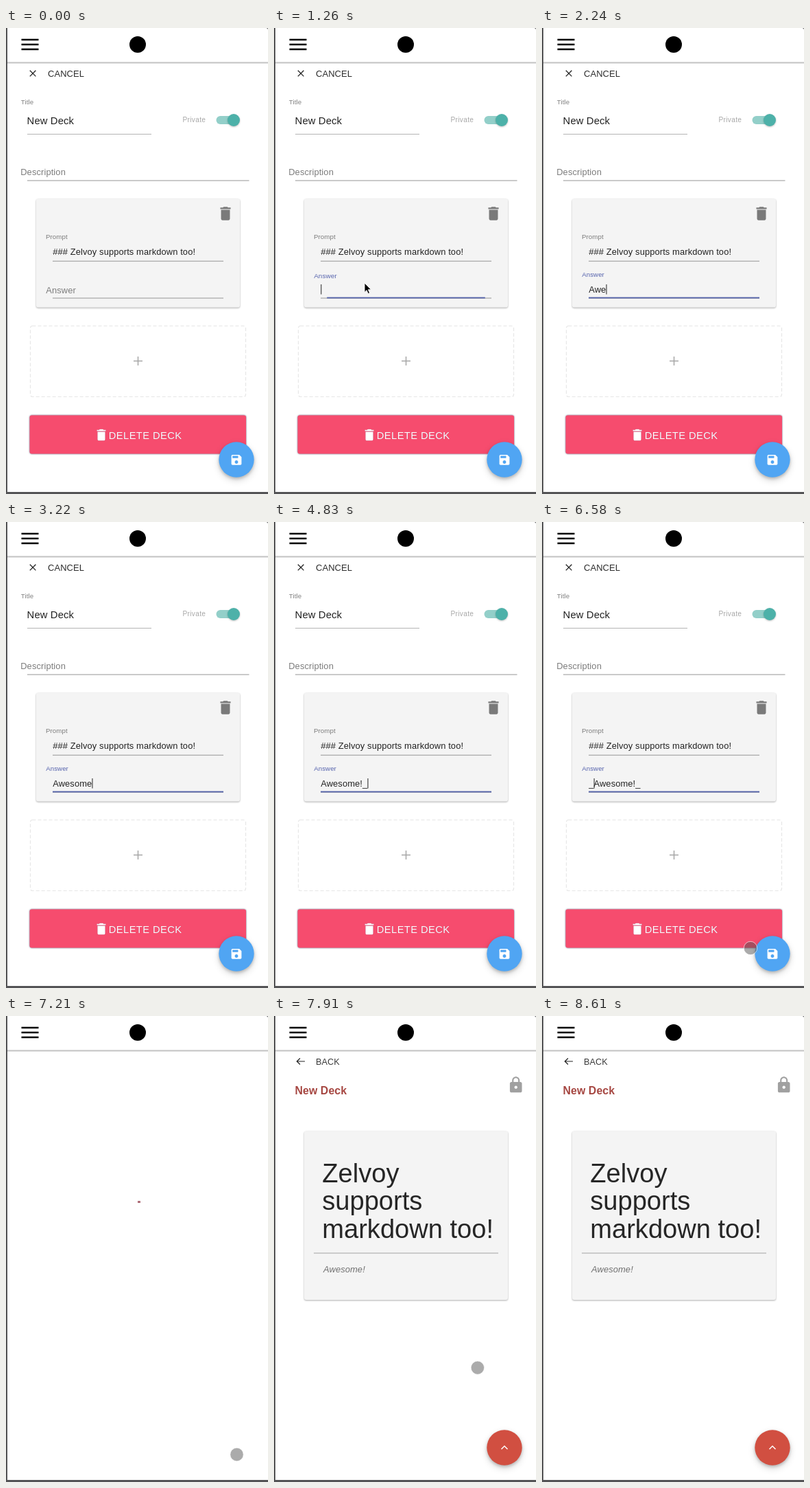
An HTML page that plays this animation: 382 by 678 pixels, repeating every 9100 ms.

```html
<!DOCTYPE html>
<html lang="en">
<head>
<meta charset="utf-8">
<title>Flashcard editor</title>
<style>
html, body { margin: 0; width: 100%; height: 100%; overflow: hidden; background: #fff; }
svg { display: block; width: 100%; height: 100%; }
text { font-family: "Liberation Sans", Arial, sans-serif; letter-spacing: .00938em; white-space: pre; }
.paper { filter: drop-shadow(0 1px 1px rgba(0,0,0,.32)); }
.raised { filter: drop-shadow(.7px .8px .9px rgba(50,40,80,.75)); }
.inked { filter: drop-shadow(.6px .7px .6px rgba(60,40,100,.5)); }
.fab { filter: drop-shadow(0 2px 2px rgba(0,0,0,.2)) drop-shadow(0 4px 5px rgba(0,0,0,.16)); }
.thumb { filter: drop-shadow(0 1px 1px rgba(0,0,0,.25)); }
</style>
</head>
<body>
<svg id="stage" viewBox="0 0 382 678" preserveAspectRatio="none">
  <defs>
    <path id="bin" d="M6 19c0 1.1.9 2 2 2h8c1.1 0 2-.9 2-2V7H6v12zM19 4h-3.5l-1-1h-5l-1 1H5v2h14V4z"/>
    <path id="disk" d="M17 3H5c-1.11 0-2 .9-2 2v14c0 1.1.89 2 2 2h14c1.1 0 2-.9 2-2V7l-4-4zm-5 16c-1.66 0-3-1.34-3-3s1.34-3 3-3 3 1.34 3 3-1.34 3-3 3zm3-10H5V5h10v4z"/>
    <path id="lock" d="M18 8h-1V6c0-2.76-2.24-5-5-5S7 3.24 7 6v2H6c-1.1 0-2 .9-2 2v10c0 1.1.9 2 2 2h12c1.1 0 2-.9 2-2V10c0-1.1-.9-2-2-2zm-6 9c-1.1 0-2-.9-2-2s.9-2 2-2 2 .9 2 2-.9 2-2 2zm3.1-9H8.9V6c0-1.71 1.39-3.1 3.1-3.1 1.71 0 3.1 1.39 3.1 3.1v2z"/>
  </defs>
  <rect width="382" height="678" fill="#fff"/>

  <g id="editor">
    <path d="M34.8 61.8l8.6 8.6m0-8.6l-8.6 8.6" stroke="#222" stroke-width="1.3"/>
    <text x="61" y="70.5" font-size="12.88" fill="#2b2b2b">CANCEL</text>
    <text x="21.8" y="110.5" font-size="9.66" fill="#808080">Title</text>
    <text x="30.6" y="139.5" font-size="14.8" fill="#222">New Deck</text>
    <path d="M31 154.5H212" stroke="#b4b4b4"/>
    <path d="M31 222H354.5" stroke="#949494"/>
    <text x="257.5" y="137.3" font-size="10.1" fill="#a8a8a8" style="letter-spacing:.0333em">Private</text>
    <rect x="306.5" y="128" width="29" height="12" rx="6" fill="#93cfc9"/>
    <circle class="thumb" cx="332" cy="134" r="9" fill="#4db1a9"/>
    <text x="21.2" y="214" font-size="12.88" fill="#7c7c7c">Description</text>

    <rect class="paper" x="44" y="248.5" width="297" height="158" rx="3" fill="#f4f4f4"/>
    <use href="#bin" transform="translate(320 270) scale(1.08) translate(-12 -12)" fill="#7a7a7a"/>
    <text x="58" y="307.3" font-size="9.66" fill="#7c7c7c">Prompt</text>
    <text x="68.2" y="330" font-size="12.88" fill="#222">### Zelvoy supports markdown too!</text>
    <path d="M68 339.2H317M68 393H317" stroke="#949494"/>
    <rect id="focusLine" y="391.6" height="1.8" fill="#5160a8"/>
    <text id="label" x="58.2">Answer</text>
    <text id="answer" x="68.2" y="385" font-size="12.88" fill="#222"></text>
    <rect id="caret" y="373" width="1" height="14.5" fill="#222"/>

    <rect x="35.5" y="433.5" width="314" height="103" rx="3" fill="none" stroke="#e6e6e6" stroke-width="1.2" stroke-dasharray="5 3"/>
    <path d="M186 484.5H199M192.5 478V491" stroke="#a6a6a6" stroke-width="1.5"/>

    <rect class="raised" x="34.5" y="563.5" width="315.5" height="56" rx="3" fill="#f64c6e"/>
    <g class="inked" fill="#fff">
      <use href="#bin" transform="translate(139 592) scale(.92) translate(-12 -12)"/>
      <text x="149.8" y="598" font-size="14.7" style="letter-spacing:.0286em">DELETE DECK</text>
    </g>

    <circle class="fab" cx="336" cy="628" r="25.7" fill="#50a5f3"/>
    <circle id="ripple" cx="336" cy="628" fill="#fff"/>
    <use href="#disk" transform="translate(336 628.3) scale(.82) translate(-12 -12)" fill="#fff"/>
  </g>

  <rect id="loader" y="269" height="3" fill="#b0707a"/>

  <g id="deck">
    <path d="M45 66H33.5M38 61.5L33.3 66L38 70.5" fill="none" stroke="#222" stroke-width="1.2"/>
    <text x="61" y="70.5" font-size="12.6" fill="#3a3a3a">BACK</text>
    <text x="30.4" y="114" font-size="15.8" font-weight="700" fill="#a64742">New Deck</text>
    <use href="#lock" transform="translate(352.7 99.8) scale(1.1) translate(-12 -11.5)" fill="#a0a0a0"/>
    <rect class="paper" x="44" y="167.5" width="297" height="245.5" rx="3" fill="#f4f4f4"/>
    <g font-size="38.1" fill="#262626">
      <text x="70.3" y="242" style="letter-spacing:0">Zelvoy</text>
      <text x="70.3" y="282.3" style="letter-spacing:0">supports</text>
      <text x="70.3" y="322.6" style="letter-spacing:0">markdown too!</text>
    </g>
    <path d="M58 345H327" stroke="#cbcbcb" stroke-width="2"/>
    <text x="72" y="372.5" font-size="12.88" font-style="italic" fill="#707070">Awesome!</text>
    <circle class="fab" cx="336" cy="628" r="25.7" fill="#d14f41"/>
    <path d="M331.5 630.3L336 625.8L340.5 630.3" fill="none" stroke="#fff" stroke-width="1.5"/>
  </g>

  <path d="M2 50.5H382" stroke="#c2c2c2" stroke-width="2"/>
  <path d="M22.5 17H47.5M22.5 24H47.5M22.5 31H47.5" stroke="#000" stroke-width="2.5"/>
  <circle cx="192" cy="24" r="12" fill="#000"/>

  <circle id="touch" r="9.7" fill="rgba(80,80,80,.48)" stroke="rgba(255,255,255,.6)"/>
  <path id="arrow" d="M132 371v13.5l3.1-2.9 2.1 4.9 2.3-1-2.1-4.8h4.2z" fill="#000" stroke="#fff" stroke-width=".9"/>

  <path d="M0 0H2V675H382V678H0ZM379 0Q382 0 382 3V0Z" fill="#545456"/>
</svg>
<script>
const LOOP = 9100, STEP = 70;
const FOCUS = 1144, PRESS = 6930, BLANK = 7140, SPIN = 7210, DECK = 7350;
const $ = id => document.getElementById(id);
const show = (id, on) => $(id).setAttribute("visibility", on ? "visible" : "hidden");
const set = (id, attrs) => {
  for (const k in attrs) $(id).setAttribute(k, attrs[k]);
};
const clamp = v => Math.min(1, Math.max(0, v));
const mix = (a, b, p) => a + (b - a) * p;
const easeOut = u => 1 - (1 - u) ** 3;
const smooth = u => u * u * (3 - 2 * u);

// Key presses: time and key, "<" moves the caret left
const keys = [];
const press = (text, from, gap) => [...text].forEach((k, i) => keys.push([from + i * gap, k]));
press("Awesome", 1960, 140);
press("!", 3430, 0);
press("_", 4480, 0);
press("<".repeat(9), 5180, 98);
press("_", 6230, 0);

// Pointer strokes: time, x, y
const strokes = [
  [[70, 175, 674], [490, 158, 520], [910, 132, 373], [1049, 132, 373]],
  [[6300, 132, 378], [6580, 304, 620], [6860, 336.5, 638], [7600, 336.5, 638]],
  [[7600, 336.5, 638], [8050, 285, 474], [8540, 175, 674], [8600, 175, 674]]
];

function pointer(t) {
  for (const s of strokes) {
    for (let i = 1; i < s.length; i++) {
      const [t0, x0, y0] = s[i - 1], [t1, x1, y1] = s[i];
      if (t < t0 || t > t1) continue;
      const p = smooth((t - t0) / (t1 - t0));
      return [mix(x0, x1, p), mix(y0, y1, p)];
    }
  }
  return null;
}

function typed(t) {
  let text = "", at = 0, last = FOCUS;
  for (const [when, key] of keys) {
    if (when > t) break;
    last = when;
    if (key === "<") at--;
    else {
      text = text.slice(0, at) + key + text.slice(at);
      at++;
    }
  }
  return { text, at, last };
}

function drawField(t) {
  const p = easeOut(clamp((t - FOCUS) / 200));
  const focused = t >= FOCUS;
  const half = 124.5 * p;
  set("focusLine", { x: 192.5 - half, width: 2 * half });
  set("label", {
    y: mix(385.5, 362, p),
    "font-size": mix(12.88, 9.66, p),
    fill: focused ? "#5865ae" : "#7c7c7c"
  });
  const { text, at, last } = typed(t);
  const el = $("answer");
  if (el.textContent !== text) el.textContent = text;
  set("caret", { x: 68.3 + (at ? el.getSubStringLength(0, at) : 0) });
  show("caret", focused && t < BLANK && (t - last) % 1000 < 500);
}

function draw(now) {
  const t = Math.floor((now % LOOP) / STEP) * STEP;
  show("editor", t < BLANK);
  show("deck", t >= DECK);
  show("loader", t >= SPIN && t < DECK);
  const w = 4 + Math.max(0, t - SPIN) / 14;
  set("loader", { x: 194 - w / 2, width: w });
  drawField(t);

  const r = clamp((t - PRESS) / 280);
  set("ripple", { r: 26 * easeOut(r), opacity: r > 0 ? .28 * (1 - r) : 0 });

  const at = pointer(t);
  show("touch", at);
  if (at) set("touch", { cx: at[0], cy: at[1] });
  show("arrow", t >= 1050 && t < 1960);
}

let start;
function tick(now) {
  start ??= now;
  draw(Math.max(0, now - start));
  requestAnimationFrame(tick);
}
draw(0);
requestAnimationFrame(tick);
</script>
</body>
</html>
```
